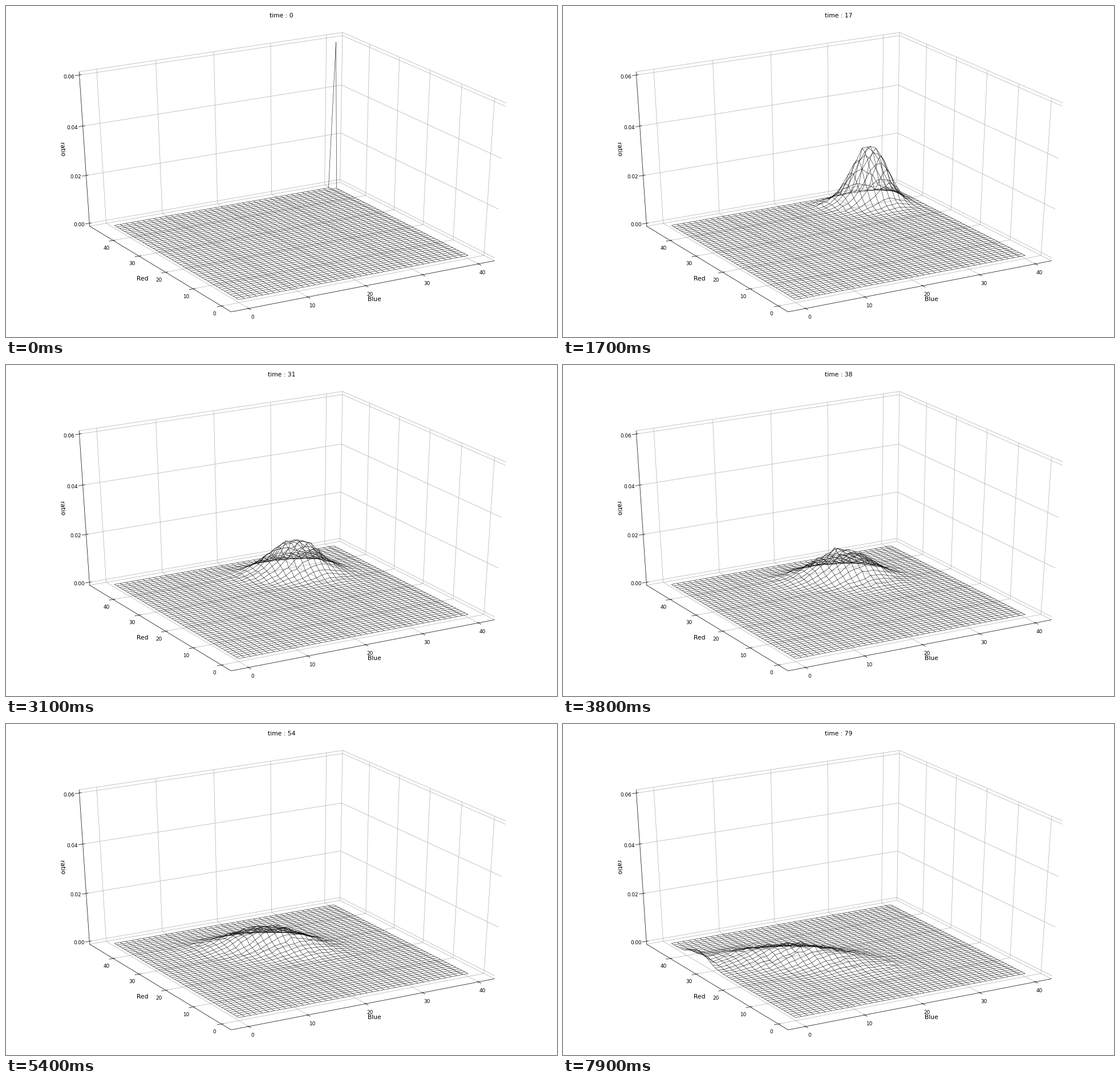
Animation of 966x580 px, one loop 8000 ms. Source, as a matplotlib script:

```python
import numpy as np
import matplotlib.pyplot as plt
from matplotlib.animation import FuncAnimation
from matplotlib.collections import LineCollection

W, H, DPI = 966, 580, 64
PAD = 9.66                      # margin around the plot area, px
FRAMES, INTERVAL = 80, 100
BLUE, RED = 40, 46              # starting strengths
HIT, RUNS = 0.01, 50000
Z_TOP = 0.06
SMALL, LARGE = 10.06, 12.08
GRAY = "#b0b0b0"

plt.rcParams["font.family"] = "DejaVu Sans"

# Camera: perspective on a unit cube centred at the origin
AZ, EL, DIST = np.radians(-120), np.radians(30), 10
RIGHT = np.array([-np.sin(AZ), np.cos(AZ), 0])
UP = np.array([-np.cos(AZ) * np.sin(EL), -np.sin(AZ) * np.sin(EL), np.cos(EL)])
NEAR = np.array([np.cos(AZ) * np.cos(EL), np.sin(AZ) * np.cos(EL), np.sin(EL)])


def project(points):
    """Cube coordinates (..., 3) to stage pixels (..., 2)."""
    p = np.asarray(points, float)
    depth = DIST - p @ NEAR
    fx = (p @ RIGHT / depth + 0.095) / 0.185
    fy = (p @ UP / depth + 0.095) / 0.185
    return np.stack([PAD + (W - 2 * PAD) * fx,
                     H - PAD - (H - 2 * PAD) * fy], axis=-1)


def unit(count, top):
    """Count to cube coordinate, with a 5% margin at both ends."""
    return (np.asarray(count) / top + 0.05) / 1.1 - 0.5


def unit_z(ratio):
    return np.asarray(ratio) / Z_TOP - 0.5


def simulate():
    """Share of runs in every (blue, red) state at each time step."""
    rng = np.random.default_rng(7)
    blue = np.full(RUNS, BLUE)
    red = np.full(RUNS, RED)
    shape = (BLUE + 1, RED + 1)
    shares = []
    for _ in range(FRAMES):
        hits = np.bincount(blue * shape[1] + red, minlength=shape[0] * shape[1])
        shares.append(hits.reshape(shape) / RUNS)
        blue_loss = rng.binomial(red, HIT)
        red_loss = rng.binomial(blue, HIT)
        blue = np.maximum(blue - blue_loss, 0)
        red = np.maximum(red - red_loss, 0)
    return np.minimum(shares, Z_TOP)


fig = plt.figure(figsize=(W / DPI, H / DPI), dpi=DPI, facecolor="white")
ax = fig.add_axes([0, 0, 1, 1])
ax.set_xlim(0, W)
ax.set_ylim(H, 0)
ax.axis("off")


def line(points, color, width, order):
    x, y = project(points).T
    ax.plot(x, y, color=color, lw=width, zorder=order, solid_capstyle="butt")


def label(point, text, size, va, angle=0):
    x, y = project(point)
    ax.text(x, y, text, size=size, ha="center", va=va, rotation=angle, zorder=4)


E = 0.5 + 1 / 48                # box half size, a little past the limits
T = 1 / 12
OUT = E + 0.0273                # tick labels
FAR = E + 0.0593                # axis names

# Back walls and floor outline
line([(E, -E, -E), (E, E, -E), (E, E, E), (E, -E, E)], GRAY, 0.8, 1)
line([(-E, E, -E), (E, E, -E)], GRAY, 0.8, 1)
line([(E, E, E), (-E, E, E)], GRAY, 0.8, 1)

for n in range(0, 41, 10):
    b, r = unit(n, BLUE), unit(n, RED)
    line([(b, -E, -E), (b, E, -E), (b, E, E)], GRAY, 0.8, 1)
    line([(-E, r, -E), (E, r, -E), (E, r, E)], GRAY, 0.8, 1)
    line([(b, -E + 0.1 * T, -E), (b, -E - 0.2 * T, -E)], "black", 0.8, 2)
    line([(-E + 0.1 * T, r, -E), (-E - 0.2 * T, r, -E)], "black", 0.8, 2)
    label((b, -OUT, -OUT), str(n), SMALL, "top")
    label((-OUT, r, -OUT), str(n), SMALL, "top")

for ratio in (0, 0.02, 0.04, 0.06):
    c = unit_z(ratio)
    line([(-E, E, c), (E, E, c), (E, -E, c)], GRAY, 0.8, 1)
    line([(-E + 0.1 * T, E, c), (-E - 0.2 * T, E, c)], "black", 0.8, 2)
    label((-OUT, OUT, c), f"{ratio:.2f}", SMALL, "top")

# Axis lines and names
line([(-E, -E, -E), (E, -E, -E)], "black", 0.8, 2)
line([(-E, -E, -E), (-E, E, -E)], "black", 0.8, 2)
line([(-E, E, -E), (-E, E, E)], "black", 0.8, 2)
label((0, -FAR, -FAR), "Blue", LARGE, "center")
label((-FAR, 0, -FAR), "Red", LARGE, "center")
label((-FAR, FAR, 0), "ratio", LARGE, "center", -86)

title = ax.text(W / 2, 0.02 * H, "", size=LARGE, ha="center", va="top")
mesh = LineCollection([], colors="black", linewidths=0.6, zorder=3)
ax.add_collection(mesh, autolim=False)

shares = simulate()
gx, gy = np.meshgrid(unit(np.arange(BLUE + 1), BLUE),
                     unit(np.arange(RED + 1), RED), indexing="ij")


def update(i):
    grid = project(np.stack([gx, gy, unit_z(shares[i])], axis=-1))
    mesh.set_segments(list(grid) + list(grid.swapaxes(0, 1)))
    title.set_text(f"time : {i}")
    return mesh, title


anim = FuncAnimation(fig, update, frames=FRAMES, interval=INTERVAL,
                     repeat=True, repeat_delay=0)
plt.show()
```
